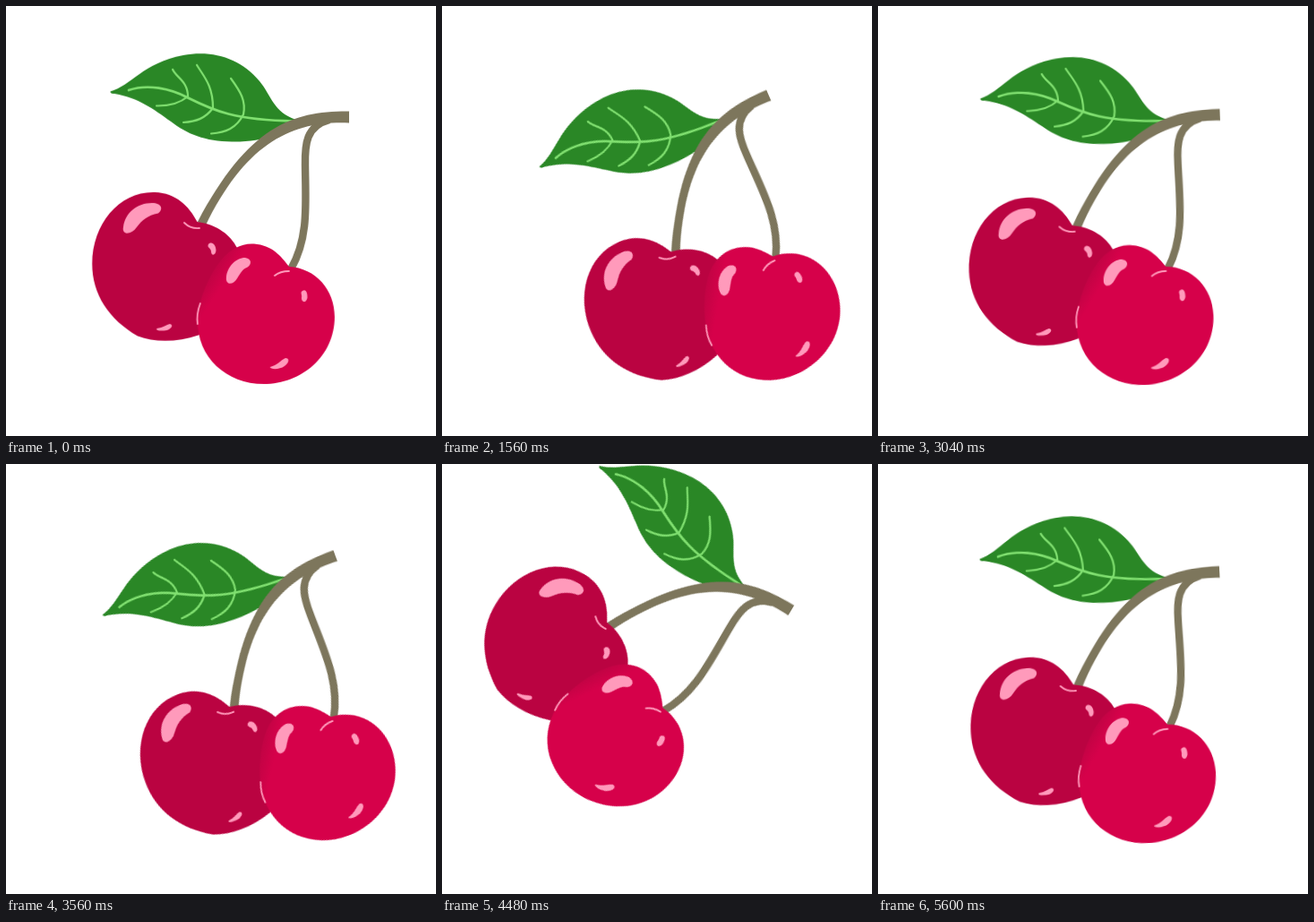
An HTML page for the animation above (5.64 s loop, 480x480 px).

```html
<!DOCTYPE html>
<html lang="en">
<head>
<meta charset="utf-8">
<title>Swinging cherries</title>
<style>
  html, body { margin: 0; width: 100%; height: 100%; overflow: hidden; background: #fff; }
  svg { display: block; width: 100vw; height: 100vh; }

  .swing {
    transform-origin: 315px 156px;
    animation: swing 5640ms linear infinite;
  }
  .leaf { fill: #2a8726; }
  .stem { fill: #7d765c; }
  .twig { fill: none; stroke: #7d765c; stroke-width: 8.4; }
  .back { fill: #ba0341; }
  .front { fill: url(#edge); }
  .shine { fill: #ff9abb; }
  .veins, .glint { fill: none; stroke-linecap: round; }
  .veins { stroke: #80e070; stroke-width: 2.2; }
  .rib { stroke-width: 2.7; }
  .glint { stroke: #ff9abb; stroke-width: 1.8; }

  /* Even drops to the right, slower swings back to the left */
  @keyframes swing {
    0%      { transform: rotate(0deg); }
    11.348% { transform: rotate(31deg); }
    24.823% { transform: rotate(-32deg); }
    27.66%  { transform: rotate(-23.4deg); }
    31.915% { transform: rotate(-10.8deg); }
    42.553% { transform: rotate(19.7deg); }
    46.809% { transform: rotate(31deg); }
    60.284% { transform: rotate(-32deg); }
    63.83%  { transform: rotate(-17.5deg); }
    72.34%  { transform: rotate(11.6deg); }
    74.468% { transform: rotate(17.7deg); }
    79.433% { transform: rotate(31deg); }
    92.908% { transform: rotate(-32deg); }
    95.745% { transform: rotate(-19.4deg); }
    99.291% { transform: rotate(-3.1deg); }
    100%    { transform: rotate(0deg); }
  }
</style>
</head>
<body>
<svg viewBox="0 0 480 480">
  <defs>
    <linearGradient id="edge" gradientUnits="userSpaceOnUse" x1="226" y1="305" x2="246" y2="318">
      <stop offset="0" stop-color="#c20344"/>
      <stop offset=".7" stop-color="#d6014a"/>
    </linearGradient>
  </defs>
  <g class="swing">
    <path class="leaf" d="M116.5 95.5C140 89 152 64 198 55C232 49 262 59 283 84C297 101 298 118 324 127C310 142 290 152 252 151.5C222 151 202 143 184 129C164 115 149 103 121 98Q116 98 116.5 95.5Z"/>
    <g class="veins">
      <path class="rib" d="M137 94C158 87 183 92 203 102.5C232 117 255 127.5 322 128.5"/>
      <path d="M186 71C190 80 203 84 203 101Q190 112 168 111.5"/>
      <path d="M213 66C220 78 231 88 231 114C222 126 212 129 198 130"/>
      <path d="M251 81C262 96 268 106 265 121C257 137 245 141 229 142.5"/>
    </g>

    <path class="twig" d="M361 127C335 134 333.5 154 334 178C334.5 222 338 258 318.5 293"/>
    <path class="stem" d="M383 117.5C321 117 271 133 214 241L222.5 246C268 152 320 128 383 130.5Z"/>

    <path class="back" d="M166 208C190 209 204 223 213.5 241C236 244 251 256 258 270L270 330L215 367.5C192 375.5 166 376 147 368.5C115 350 96.3 322 96.3 288C96.3 243 127 207 166 208Z"/>
    <g class="shine">
      <path d="M131 247C133 230 148 219 165 220C175 221 175 228 170 231.5C158 234 152 239 146 247C140 256 129 256 131 247Z"/>
      <path d="M226 266C230 262 234.5 267 234.5 273C234 279 229 279 229 274C229 270 224 270 226 266Z"/>
      <path d="M168.5 360C176 359 179 356 183 355C187.500 356 185 360 180 362C174 363 167 363 168.500 360Z"/>
    </g>
    <path class="glint" d="M199 242Q206 249 216 248"/>

    <path class="front" d="M277 265.500C297 267 307 279 316 291C346 292.500 367 317 367 347C367 391 330 422 288 422C246 422 213.500 392 214 351C215 327 227 300 240 284C250 271 264 264.500 277 265.500Z"/>
    <g class="shine">
      <path d="M246 303C247 291 257 281 267 281C275 282 274.500 289 269 292C264 294 262 298 258.500 303.500C254 312 245 312 246 303Z"/>
      <path d="M331 318C335 315 337 321 336.500 326C335 332 330 331 330 326C331 322 328 320 331 318Z"/>
      <path d="M295 403C303 401 306 396 312 393C317 393 316.500 398 311 402C306 406 295 406 295 403Z"/>
    </g>
    <path class="glint" d="M300 301Q306 296 316 296M217 332C214 340 213 348 214 355"/>
  </g>
</svg>
</body>
</html>
```
